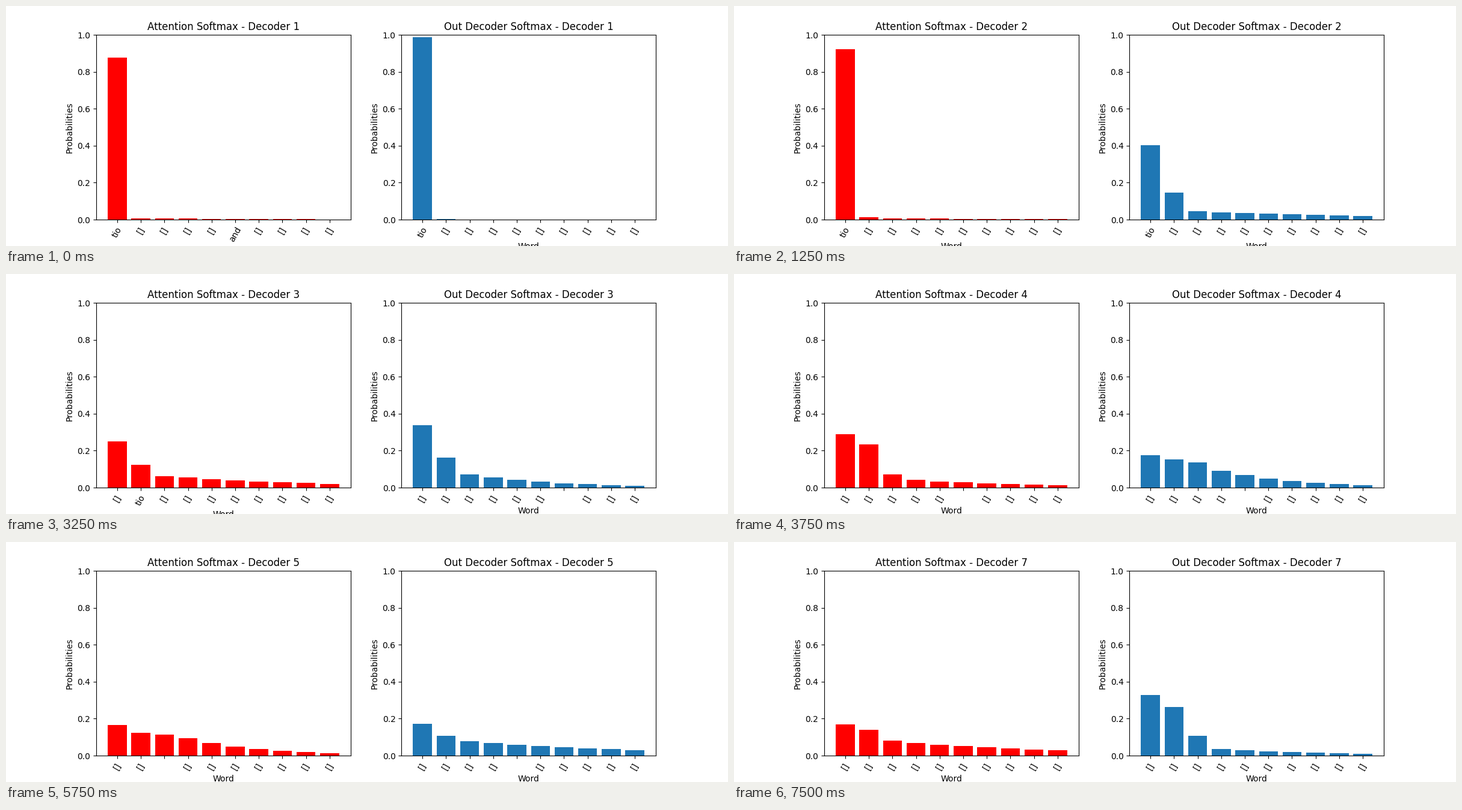
These frames come from a looping animation (1200x400 px, 8 s). A matplotlib script:

```python
import matplotlib.pyplot as plt
import numpy as np
from matplotlib.animation import FuncAnimation

FRAMES, INTERVAL = 32, 250
HOLD = 5  # animation frames each decoder step stays on screen
BARS = 10


def falloff(*head, last):
    """Leading probabilities, then a geometric decay down to the last bar."""
    tail = np.geomspace(head[-1], last, BARS - len(head) + 1)
    return [*head, *tail[1:]]


# Per step: bar heights, then the words that are not "[]".
ATTENTION = [
    (falloff(.877, .008, last=.0015), {0: "tio", 5: "and"}),
    (falloff(.922, .014, .006, last=.003), {0: "tio"}),
    (falloff(.25, .123, .063, last=.021), {1: "tio"}),
    (falloff(.289, .234, .071, .041, last=.013), {5: ""}),
    (falloff(.166, .123, .114, .094, last=.013), {2: ""}),
    (falloff(.114, .088, last=.037), {2: ""}),
    (falloff(.169, .14, .08, last=.028), {}),
]
OUTPUT = [
    (falloff(.987, .004, .001, last=.001), {0: "tio"}),
    (falloff(.403, .146, .044, last=.021), {0: "tio"}),
    (falloff(.338, .162, .07, last=.011), {6: ""}),
    (falloff(.175, .153, .136, .091, last=.014), {4: ""}),
    (falloff(.172, .107, .078, last=.03), {4: ""}),
    (falloff(.12, .107, .084, last=.035), {}),
    (falloff(.328, .263, .107, .036, last=.011), {}),
]

fig, (left, right) = plt.subplots(1, 2, figsize=(12, 4), dpi=100)


def draw_chart(ax, title, color, data, step):
    heights, words = data[step]
    ax.clear()
    ax.bar(range(BARS), heights, color=color)
    ax.set_xticks(range(BARS), [words.get(i, "[]") for i in range(BARS)],
                  rotation=60)
    ax.set_ylim(0, 1)
    ax.set_xlabel("Word")
    ax.set_ylabel("Probabilities")
    ax.set_title(f"{title} - Decoder {step + 1}")


def update(frame):
    step = frame // HOLD
    draw_chart(left, "Attention Softmax", "red", ATTENTION, step)
    draw_chart(right, "Out Decoder Softmax", "tab:blue", OUTPUT, step)
    return []


anim = FuncAnimation(fig, update, frames=FRAMES, interval=INTERVAL,
                     init_func=lambda: update(0), repeat=True, repeat_delay=0)
plt.show()
```
